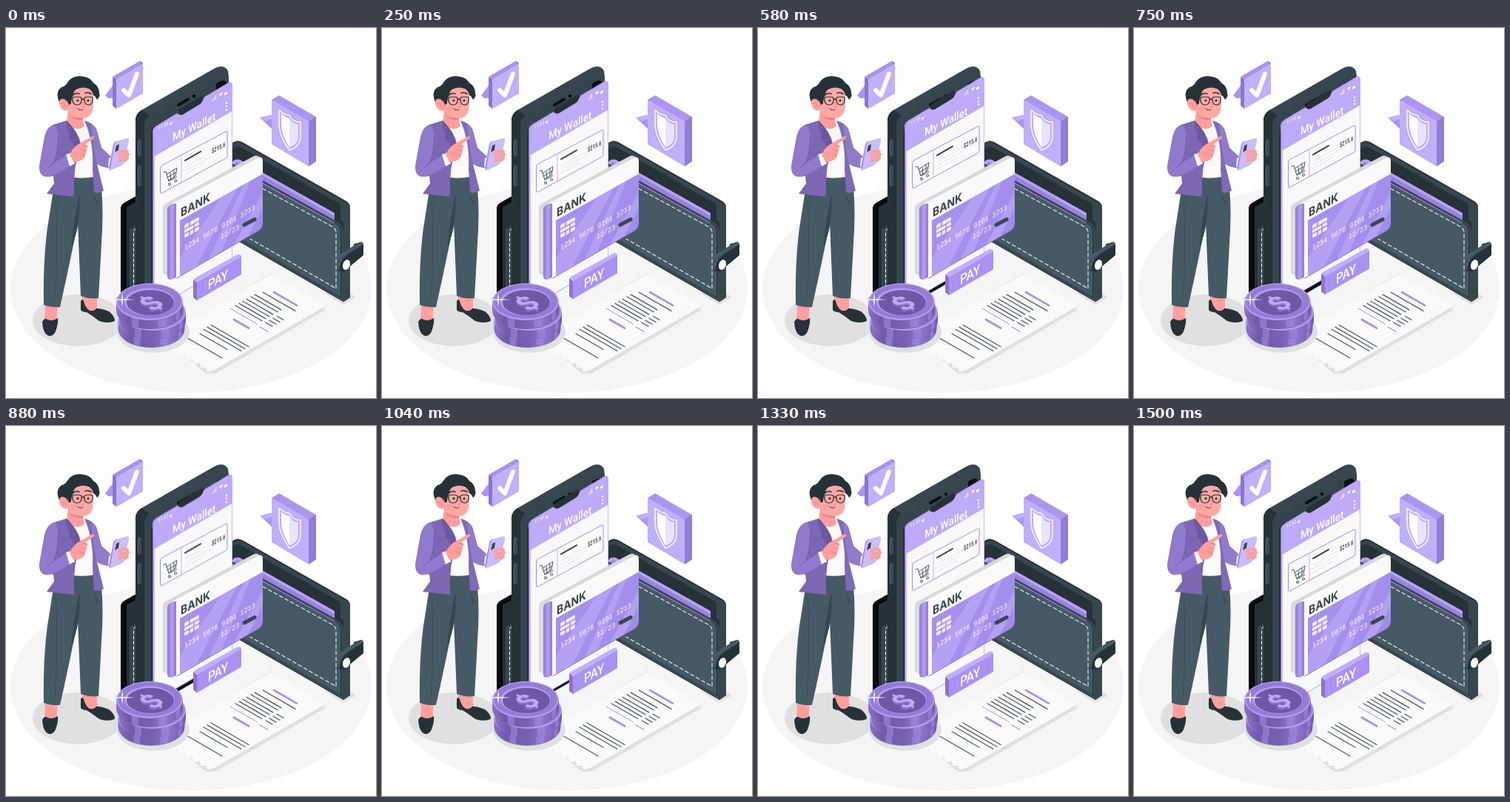
An HTML page for the animation above (1.54 s loop, 500 by 500 pixels).

```html
<!DOCTYPE html>
<html lang="en">
<head>
<meta charset="utf-8">
<title>My Wallet</title>
<style>
html, body { margin: 0; width: 100%; height: 100%; overflow: hidden; background: #fff; }
svg { display: block; width: 100vw; height: 100vh; }
text { font-family: Roboto, Arial, sans-serif; }
.float { animation: float 1540ms infinite ease-in-out; }
@keyframes float { 50% { transform: translateY(-8px); } }
.line { fill: none; stroke-linecap: round; stroke-linejoin: round; }
.ink { stroke: #37474f; }
.mid { fill: #ab95f0; }
.light { fill: #c0aff9; }
.deep { fill: #8b74cc; }
.dark { fill: #263238; }
.slate { fill: #37474f; }
.skin { fill: #ff9f9c; }
.mono { font: 9.7px "Liberation Mono", monospace; }
</style>
</head>
<body>
<svg viewBox="0 0 500 500">
<defs>
  <linearGradient id="rim">
    <stop offset="0" stop-color="#8a72c8"/><stop offset=".18" stop-color="#6f5aa8"/>
    <stop offset=".5" stop-color="#7661b0"/><stop offset=".75" stop-color="#8d76cc"/>
    <stop offset="1" stop-color="#6f5aa8"/>
  </linearGradient>
  <linearGradient id="cardFill" x2="1" y2="1">
    <stop offset="0" stop-color="#a994f2"/><stop offset="1" stop-color="#a08ae8"/>
  </linearGradient>
  <linearGradient id="edge">
    <stop offset="0" stop-color="#8d75d2"/><stop offset=".5" stop-color="#b5a0f5"/><stop offset="1" stop-color="#9079d2"/>
  </linearGradient>
  <clipPath id="cardClip"><path d="M235 260L347 197V263Q347 270 341 274L235 335Z"/></clipPath>
  <g id="coin">
    <path d="M-45 0V12A45 25 0 0 0 45 12V0Z" fill="url(#rim)"/>
    <path d="M-24 21v12l9 2v-12zM12 24v11l10-2v-11zM36 15v11l5-5v-11z" fill="#a48de6" opacity=".55"/>
    <ellipse rx="45" ry="25" fill="#b39df2"/>
    <ellipse cy="-.5" rx="43" ry="23.200" fill="#937cd2"/>
  </g>
</defs>

<ellipse cx="250" cy="352" rx="244" ry="141" fill="#f5f5f5"/>
<ellipse cx="97" cy="395" rx="61" ry="35" fill="#e0e0e0"/>
<path d="M430 358L455 374 473 364 462 356Z" fill="#e0e0e0"/>
<path d="M146 366L176 349 200 372 170 384Z" fill="#e0e0e0"/>

<!-- wallet -->
<path d="M155 244Q155 239 160 236L176 227H190V378L155 366Z" fill="#070b0d"/>
<path d="M163 242L190 227V378L163 366Z" class="dark"/>
<path d="M167 272L190 259V375L167 366Z" class="slate"/>
<path d="M172.500 358V274L176 270" class="line" stroke="#fff" stroke-dasharray="4 3"/>
<path d="M300 160L308 154Q313 151 319 154L460 234Q465 237 465 243V364L456 370 300 280Z" class="dark"/>
<path d="M300 163L308 156Q313 153 319 156L458 235 464 239 456 246V262L318 180 300 180Z" class="slate"/>
<path d="M306 163Q311 158 317 161L452 238V262L318 184 300 184Z" class="dark"/>
<path d="M456 246Q457 242 464 239Q465 240 465 243V364L456 370Z" class="slate"/>
<path d="M305 187Q306 178 315 179L444 251V266L430 262 305 196Z" fill="#9a83de"/>
<path d="M305 184Q307 176 316 178L444 250V254L316 182Q309 180 307 187Z" fill="#b7a2f8"/>
<path d="M300 185L446 265Q452 268 452 275V366L300 279Z" fill="#455a64"/>
<path d="M300 183L446 264Q453 268 453 275V368L456 370V274Q455 266 448 262L300 180Z" class="slate"/>
<path d="M300 275L452 363 456 370 300 280Z" class="slate"/>
<path d="M347 217L442 269Q446 272 446 276V352L330 285" class="line" stroke="#eceff1" stroke-width="1.100" stroke-dasharray="5 3.500"/>
<path d="M447 314L470 300V292L480 289Q483 290 483 293V307L465 322Q459 331 451 329Q447 328 447 322Z" class="dark"/>
<path d="M447 309L470 294 480 289 483 292 460 307Q452 312 450 328Q447 326 447 321Z" fill="#455a64"/>
<ellipse cx="460" cy="320" rx="4.800" ry="7" transform="rotate(18 460 320)" fill="#fff"/>

<!-- receipt -->
<path d="M218 422L358 336 432 381 283 467 270 467Z" fill="#e0e0e0"/>
<path d="M214 417L360 332l1 5 8 0 1 5 8 0 1 5 8 0 1 5 8 0 1 5 8 0 1 5 8 0 1 5 8 0 1 5 8 4L284 461l-12 4-1-6-8 0-1-6-9 1-1-6-9 0-1-6-8 1-1-6-8 0-1-6-8 0Z" fill="#fafafa"/>
<path d="M318 355L360 331M284 461L432 376" class="line" stroke="#dedede" stroke-width=".7"/>
<g id="print" class="line"></g>

<!-- phone -->
<path d="M175 366V125Q175 116 183 111L281 55Q294 48 300 58L301 66V319L187 385Z" class="slate"/>
<path d="M187 385V131Q187 124 193 120L287 66Q300 59 301 73V319Z" fill="#35454d"/>
<path d="M175 125Q175 116 183 111L194 118Q187 123 187 131V385L175 366Z" class="dark"/>
<path d="M197 379V141Q197 135 202 132L284 85V75Q297 66 299 77V319Z" fill="#0c1114"/>
<path d="M180.500 153V171M180.500 188V211" class="line" stroke="#455a64" stroke-width="5"/>
<path d="M181.500 153V171M181.500 188V211" class="line" stroke="#37474f" stroke-width="3"/>
<path d="M233 104L246 96.500" class="line" stroke="#0b1013" stroke-width="4"/>
<circle cx="254" cy="92" r="2.200" fill="#0b1013"/>

<!-- floating screen -->
<g class="float">
  <path d="M198 381V140Q198 135 203 132L300 74Q306 71 306 79V319Z" class="mid"/>
  <path d="M200.500 379V140Q201 136 205 133L300 77Q305 74 305.400 80V318Z" fill="#f8f8f9"/>
  <path d="M200 174V140Q200 135 204 132L229 117Q232 116 233 117Q235 119 239 117L262 103Q266 101 266 97Q266 95 270 93L300 75Q306 72 306 80V112Z" fill="#bdabf8"/>
  <path d="M232 115L234 110 264 92 268 94Q266 96 266 98Q265 101 262 103L239 117Q234 119 232 115Z" class="dark"/>
  <g fill="#fff">
    <text transform="matrix(.87 -.43 0 1 225 153)" font-size="15.200" font-weight="500">My Wallet</text>
    <text transform="matrix(.866 -.5 0 1 206 138.500)" font-size="6.200">11:53</text>
    <path d="M220 130l5-4-2 6-1-2z"/>
    <path d="M279 99v-2l1-.5v2zM281 98v-4l1-.5v4zM283 97v-6l1-.5v6zM288 90q2-3 5-3l-2.500 5zM295 88l4-2.300v3l-4 2.300z"/>
    <circle cx="298" cy="101.500" r="1.200"/><circle cx="298" cy="106" r="1.200"/><circle cx="298" cy="110.500" r="1.200"/>
  </g>
  <path d="M208.500 189Q208.500 187 211 185.500L297 140Q299 139 299 141V173Q299 175 297 176L211 223Q208.500 224 208.500 222Z" fill="#fafafa" stroke="#a08af0"/>
  <path d="M237 173V208" stroke="#b5a0f5" stroke-width=".8"/>
  <g class="line ink" stroke-width=".9">
    <path d="M213 195l3-1 4 13 11-6M217 198l14-9-2 11-9 6M222 196l1 9M227 192v9M218 202l12-7"/>
    <circle cx="221" cy="211" r="1.600"/><circle cx="229" cy="206.500" r="1.600"/>
  </g>
  <path d="M242 179L263 167" class="line" stroke="#263238" stroke-width="2"/>
  <path d="M242 188L276 169M242 193L276 174M242 198L268 183" class="line" stroke="#dcdbe0" stroke-width=".8"/>
  <text transform="matrix(.8 -.42 0 1.150 278 169.500)" font-size="7.400" font-weight="500" class="dark">$215.6</text>
</g>

<!-- bank card -->
<path d="M212 244Q212 239 216 237L335 173Q340 171 346 177L340 272 222 337 212 331Z" fill="#d9d9d9"/>
<path d="M218 246Q218 241 223 238L340 176Q347 172 347 180V263Q347 270 341 274L226 339Q218 342 218 335Z" fill="#fafafa"/>
<path d="M218 246Q218 241 223 238L230 237V337L226 339Q218 342 218 335Z" fill="url(#edge)"/>
<g clip-path="url(#cardClip)">
  <path d="M230 190H348V340H230Z" fill="url(#cardFill)"/>
  <path d="M230 318L300 215 318 206 248 340 230 340ZM268 325L325 204 333 200 282 325ZM302 304L348 220V240L316 304Z" fill="#c3b3fa" opacity=".5"/>
</g>
<path d="M231 338L341 274Q347 270 347 263" class="line" stroke="#846cc5"/>
<text transform="matrix(.866 -.48 0 1 236 255.500)" font-size="16" font-weight="700" style="font-family:Inter,sans-serif" class="slate">BANK</text>
<path d="M241 268Q241 266 243 265L259 256Q261 255 261 257V271Q261 273 259 274L243 283Q241 284 241 282Z" fill="#eee9fd"/>
<path d="M241 272L261 261M241 278L261 267M248 262V269M254 266V277M248 274V280" class="line" stroke="#957edb" stroke-width="1.300"/>
<g fill="#fff">
  <text transform="matrix(.866 -.5 0 1 241 300)" class="mono">1234 5678 9101 1213</text>
  <text transform="matrix(.866 -.5 0 1 290 286)" class="mono">12/23</text>
</g>
<path d="M322 266L336 258.500" class="line" stroke="#37474f" stroke-width="5"/>

<!-- pay button -->
<g class="float">
  <path d="M253 342Q253 340 255 338L313 306Q316 305 318 308V333L258 368 253 364Z" class="light"/>
  <path d="M253 340L258 344V368L253 364Z" class="deep"/>
  <path d="M258 344L318 309V333L258 368Z" fill="#a992f2"/>
  <text transform="matrix(.866 -.5 0 1 273 354)" font-size="18" font-weight="500" fill="#fff">PAY</text>
</g>

<!-- speech bubbles -->
<path d="M134 91L144 78 150 80V94L138 95Z" class="mid"/>
<path d="M144 68Q144 66 146 65L181 45 185 47V88L149 109 144 105Z" class="deep"/>
<path d="M144 66L181 44.500 185 47 149 69Z" fill="#a891ee"/>
<path d="M149 69L185 47.500V88L149 109Z" class="light"/>
<path d="M159 84L166 91 177 62" class="line" stroke="#fff" stroke-width="6"/>

<path d="M343 121L361 117V138Z" class="mid"/>
<path d="M343 121L361 117V122L351 126Z" class="light"/>
<path d="M359 97L369 91 419 120V180L409 187Z" fill="#ab95f0"/>
<path d="M409 126L419 120V180L409 187Z" fill="#937cd6"/>
<path d="M359 97L409 126V187L359 157Z" class="light"/>
<path d="M383 118Q388 128 398 127V147Q397 161 383 165Q370 147 369 132V111Q377 118 383 118Z" class="line" stroke="#fff" stroke-width="1.400"/>
<path d="M383 122Q388 131 395 130V147Q394 158 383 161Q373 145 372 132V116Q378 121 383 122Z" fill="#fff"/>
<path d="M383 122Q388 131 395 130V147Q394 158 383 161Z" fill="#e9e3fc"/>

<!-- coins -->
<ellipse cx="199" cy="411" rx="49" ry="28" fill="#e0e0e0"/>
<use href="#coin" x="196.500" y="395"/>
<use href="#coin" x="198" y="384"/>
<use href="#coin" x="194" y="370"/>
<ellipse cx="194" cy="370" rx="34" ry="18.500" fill="#b39df2"/>
<ellipse cx="195" cy="371" rx="32" ry="17" fill="#6e59a6"/>
<g text-anchor="middle" font-size="36" font-weight="700">
  <text transform="matrix(.866 -.5 .866 .5 196 374)" y="13" fill="#8b74cb">$</text>
  <text transform="matrix(.866 -.5 .866 .5 196 371.500)" y="13" fill="#bda9f7">$</text>
</g>
<path d="M157 357l1 9 16 1-16 1-1 9-1-9-12-1 12-1z" fill="#fff"/>

<!-- woman -->
<path d="M53 373H70L68 398H52Z" class="skin"/>
<path d="M102 361H123L123 386 108 385Z" class="skin"/>
<path d="M49 397Q52 391 56 394Q63 397 70 392Q71 399 67 410Q64 417 58 416Q50 414 49 397Z" class="dark"/>
<path d="M101 369Q103 365 105 369Q107 378 113 382Q119 383 122 379Q130 379 139 383Q147 389 147 396Q137 400 126 396Q114 387 109 384Q103 384 101 381Z" class="dark"/>
<path d="M64 219L92 200H119L129 216Q132 250 129 290Q127 330 125 365Q113 367 101 362L97 262Q88 310 73 377Q61 378 51 374Q50 315 56 270Z" fill="#455a64"/>
<path d="M99 225Q101 250 96 273L88 302Q91 262 99 225ZM118 224Q121 238 127 242" fill="#37474f"/>
<path d="M67 232Q72 290 66 366" class="line ink" stroke-width=".7"/>
<path d="M80 126L108 126 119 142 121 201Q105 204 91 202Z" fill="#fafafa"/>
<path d="M84 110L103 118 106 132Q97 142 82 129Z" class="skin"/>
<path d="M85 117Q94 123 104 121L104 124Q92 126 85 117Z" fill="#ef7f80"/>
<path d="M106 125Q117 128 122 136L129 162 142 174 139 189Q130 188 123 184L132 220Q125 224 119 222L117 190Q119 155 106 125Z" fill="#8069b6"/>
<path d="M115 131Q121 133 123 140L129 162 142 174 139 189Q130 188 123 184Q117 160 115 131Z" fill="#907acb"/>
<path d="M82 125L66 130Q55 133 52 148L45 187Q45 201 56 201L64 200 65 210 55 224 92 228Q90 190 101 156Q98 142 82 125Z" fill="#7d67b3"/>
<path d="M82 125Q80 135 87 145L85 149 99 166Q105 148 82 125Z" fill="#6d589f"/>
<path d="M66 130Q55 133 52 148L45 187Q45 201 56 201Q70 199 87 186L81 172 64 183Q71 167 70 150Q71 139 66 130Z" fill="#907acb"/>
<path d="M70 150Q71 167 64 183L57 189" class="line" stroke="#6d589f" stroke-width=".8"/>
<path d="M81 171L87 169 93 183 86 187Z" fill="#fff"/>
<path d="M86 171Q89 164 96 158L117 146Q121 146 118 150L107 157Q112 160 108 167Q108 174 103 178Q97 182 91 181Z" class="skin"/>
<path d="M104 158L111 160M101 164L108 167M99 169L106 173" class="line" stroke="#ef7f80"/>
<path d="M139 176L150 170 152 183 138 188Z" fill="#fafafa"/>
<path d="M149 169Q157 163 164 167Q168 170 164 179Q158 185 149 183Z" class="skin"/>
<path d="M139 189L145 158Q146 154 149 153L164 149Q167 149 166 153L160 181Q159 184 156 186L142 192Q138 193 139 189Z" fill="#cbbdf9"/>
<path d="M139 189L145 158Q146 154 149 153L146 160 141 191Z" fill="#a48dea"/>
<path d="M149 159l4-2-1 8-5 3z" class="slate"/>
<path d="M153 169Q157 165 164 167M153 174Q159 171 165 171M153 179Q158 177 164 176" class="line" stroke="#ff9f9c" stroke-width="4"/>

<path d="M82 82L115 78Q120 96 117 111Q114 122 104 122Q89 120 82 109Z" fill="#ffa9a5"/>
<path d="M76 108Q72 103 70 94Q68 85 75 80Q80 79 83 74Q88 65 100 65Q114 66 118 74Q126 79 126 88Q128 92 123 97Q121 92 118 91Q117 85 112 82Q104 79 97 82Q91 84 91 91Q88 95 88 102L85 104 81 98 78 99Z" class="dark"/>
<path d="M84 101Q78 93 73 97Q70 101 75 109Q80 114 86 110Z" class="skin"/>
<path d="M75 101Q80 102 81 108" class="line" stroke="#ef7f80" stroke-width=".8"/>
<g class="line" stroke="#263238">
  <path d="M90 94Q96 92 102 94Q103 104 96 104Q89 104 90 94ZM106 94Q112 92 117 94Q118 103 112 104Q105 104 106 94ZM102 97Q104 95 106 97M84 97L90 96" stroke-width="1.200"/>
  <path d="M91 90Q95 87 99 89M107 88Q111 86 115 89" stroke-width="1.600"/>
</g>
<circle cx="97" cy="98" r="1.600" class="dark"/><circle cx="111" cy="98" r="1.600" class="dark"/>
<path d="M103 100L106 106 103 107" class="line" stroke="#ef7f80"/>
<path d="M97 109Q100 112 104 110" class="line" stroke="#a34852" stroke-width="1.300"/>
<ellipse cx="91" cy="108" rx="4" ry="2.500" fill="#ff8f91" opacity=".55"/>
</svg>
<script>
const print = document.getElementById("print");

// Parallel rows on the receipt: start, length, count, colour, weight
function rows(x, y, length, count, colour, weight, gap = 6) {
  let d = "";
  for (let i = 0; i < count; i++) {
    d += `M${x + i * gap} ${y - i * gap * .577}l${length} ${length * .577}`;
  }
  const path = document.createElementNS("http://www.w3.org/2000/svg", "path");
  path.setAttribute("d", d);
  path.setAttribute("stroke", colour);
  path.setAttribute("stroke-width", weight);
  print.append(path);
}

const ink = "#455a64", violet = "#a98ff0";
rows(240, 416, 52, 1, ink, 1.2);
rows(262, 413, 37, 1, ink, 1.2);
rows(267, 407, 51, 3, ink, 1.2, 5);
rows(308, 394, 20, 1, violet, 3);
rows(303, 379, 36, 1, violet, 1);
rows(310, 375, 36, 4, ink, 1.2, 5);
rows(331, 363, 36, 2, ink, 1.2, 5);
rows(347, 357, 44, 1, ink, 1.2);
rows(343, 404, 11, 1, violet, 1.2);
rows(351, 398, 9, 4, ink, 1.2, 5);
rows(362, 357, 31, 1, violet, 2.6);
</script>
</body>
</html>
```
